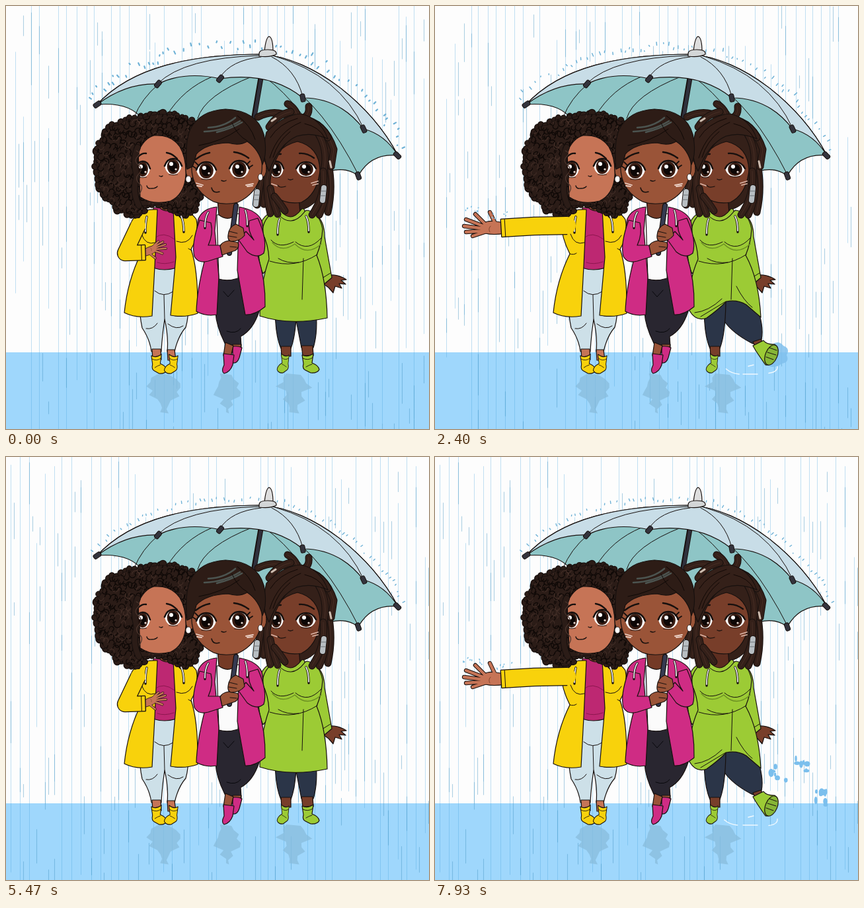
Animation, 640 px wide and 640 px high, one loop 8000 ms. Source, as an HTML page:

```html
<!DOCTYPE html>
<html lang="en">
<head>
<meta charset="utf-8">
<title>Three friends in the rain</title>
<style>
html, body { margin: 0; width: 100%; height: 100%; overflow: hidden; background: #fdfdfd; }
svg { display: block; width: 100%; height: 100%; }
</style>
</head>
<body>
<svg id="stage" viewBox="0 0 640 640" stroke-linecap="round" stroke-linejoin="round"></svg>
<script>
const LOOP = 8000, STEP = 1000 / 15, CYCLE = 5270;
const INK = '#17100e', YELLOW = '#f8d20c', PINK = '#cf2c84', GREEN = '#9ccb35', NAVY = '#2b3548';
const SKIN = ['#c67456', '#9a5438', '#783e2a'];
const HAIR = ['#2b1c17', '#2d1c16', '#342019'];
const stage = document.getElementById('stage');

function rng(seed) {
  return () => {
    seed = (seed * 1664525 + 1013904223) >>> 0;
    return seed / 4294967296;
  };
}
const shape = (d, fill, w = 1.2) => `<path d="${d}" fill="${fill}" stroke="${INK}" stroke-width="${w}"/>`;
const line = (d, w = 1, color = INK) => `<path d="${d}" fill="none" stroke="${color}" stroke-width="${w}"/>`;
const tube = (d, color, w) => line(d, w + 2) + line(d, w, color);
const oval = (x, y, rx, ry, fill, extra = '') => `<ellipse cx="${x}" cy="${y}" rx="${rx}" ry="${ry}" fill="${fill}" ${extra}/>`;
const group = (id, body) => `<g id="${id}">${body}</g>`;

function eye(x, y, rx, ry) {
  const lid = `M${x - rx},${y - 1} Q${x - rx * .7},${y - ry} ${x},${y - ry} Q${x + rx * .7},${y - ry} ${x + rx},${y - 1}`;
  return `<path d="${lid} Q${x + rx * .8},${y + ry} ${x},${y + ry} Q${x - rx * .8},${y + ry} ${x - rx},${y - 1} Z" fill="#fff"/>` +
    oval(x, y, rx * .72, ry * .93, '#3a1d13') + oval(x, y, rx * .5, ry * .66, '#0d0706') +
    oval(x - 3, y - 4, 3, 3, '#fff') + oval(x + 4, y + 4, 1.6, 1.6, '#e9d8d0') +
    line(lid, 2.6) + line(`M${x - rx * .5},${y + ry} Q${x},${y + ry + 1.5} ${x + rx * .5},${y + ry}`, .8);
}

const string = (x, y, dx) => line(`M${x},${y} Q${x + dx},${y + 8} ${x + dx},${y + 24}`, 3.4) +
  line(`M${x},${y} Q${x + dx},${y + 8} ${x + dx},${y + 22}`, 1.8, '#e6e6e6');

function boot(x, y, dir, color) {
  return `<g transform="translate(${x},${y}) scale(${dir},1)">` +
    shape('M-9,-25 Q-1,-21 8,-27 L6,-13 Q16,-9 17,-3 Q14,3 4,2 L-4,-2 Q-9,-4 -7,-12 Z', color) +
    line('M-8,-20 Q0,-16 7,-21 M-3,-7 Q2,-10 6,-11', .9) + '</g>';
}

function reflection(x, seed) {
  const r = rng(seed), left = [], right = [];
  for (let i = 0; i < 10; i++) {
    const w = (1 - Math.abs(i - 3) / 8) * 25 + (r() - .5) * 14;
    left.push(`${x - w + r() * 6},${556 + i * 6.5}`);
    right.unshift(`${x + w - r() * 6},${558 + i * 6.5}`);
  }
  return `<polygon points="${left.concat(right).join(' ')}" fill="#88bddd" opacity=".75"/>`;
}

const CANOPY = 'M138,149 C190,92 280,73 388,73 C466,80 552,148 593,226';

function umbrella() {
  const tips = [[138, 149, -35], [230, 118, -50], [324, 110, -50], [449, 139, 80], [541, 186, 65], [592, 226, 45], [533, 257, 70]];
  return shape(CANOPY + ' Q552,222 533,257 Q515,243 490,250 L300,225 Q225,215 207,172 Q188,145 138,149 Z', '#8ec5c6') +
    line('M312,107 Q268,125 243,166 M374,106 Q300,135 290,170 M231,118 Q205,140 194,168 M418,113 Q480,150 533,255 M391,107 Q450,150 497,244') +
    line('M386,106 L375,170', 8) + line('M386,108 L376,168', 5, '#30313c') +
    shape(CANOPY + ' Q573,194 541,186 Q505,139 449,139 Q400,99 324,110 Q270,98 230,118 Q182,116 138,149 Z', '#c8dde7') +
    line('M384,75 Q270,78 230,117 M386,77 Q340,82 324,108 M402,77 Q438,95 449,137 M407,76 Q505,105 541,185') +
    shape('M391,69 Q393,48 398,46 Q404,48 404,69 Z', '#dedede') +
    shape('M383,72 Q383,66 396,66 Q410,66 409,73 Q400,78 383,76 Z', '#d3d6d7') +
    tips.map(([x, y, a]) => `<rect x="${x - 6}" y="${y - 3.5}" width="12" height="7" rx="2.5" fill="#34343d" stroke="${INK}" transform="rotate(${a} ${x} ${y})"/>`).join('');
}

const CURLS = 'M205,170 Q245,155 283,176 Q300,200 292,250 Q299,290 283,311 Q265,323 240,300 L208,302 Q207,320 188,315 Q167,311 162,295 Q138,287 140,255 Q131,222 146,204 Q148,181 171,180 Q184,168 205,170 Z';

function curlTexture() {
  const r = rng(41);
  let d = '', glow = '';
  for (let y = 160; y < 325; y += 8)
    for (let x = 134; x < 304; x += 8) {
      const px = x + r() * 6, py = y + r() * 6, s = 3 + r() * 2.5;
      const arc = `M${px - s},${py} a${s},${s} 0 1 ${r() > .5 ? 1 : 0} ${s * 1.6},${s * .8}`;
      if (r() > .8) glow += arc; else d += arc;
    }
  return line(d, 1.3, '#0e0806') + line(glow, .9, '#4b352d');
}

function curlEdge() {
  const path = document.createElementNS('http://www.w3.org/2000/svg', 'path');
  path.setAttribute('d', CURLS);
  const total = path.getTotalLength(), r = rng(8);
  let out = '';
  for (let s = 0; s < total; s += 7) {
    const p = path.getPointAtLength(s);
    out += oval(p.x + r() * 4 - 2, p.y + r() * 4 - 2, 4 + r() * 2, 4 + r() * 2, HAIR[0], `stroke="${INK}" stroke-width="1.3"`);
  }
  return out;
}

function leftGirl() {
  const face = 'M203,289 L200,221 Q209,200 224,196 Q250,194 263,213 Q273,230 272,256 Q270,285 249,295 Q222,302 203,289 Z';
  return shape('M205,392 L273,392 Q280,460 272,486 Q260,500 255,523 L244,523 Q246,500 240,474 Q236,500 235,523 L220,523 Q218,505 206,487 Q198,450 205,392 Z', '#cde0e8') +
    line('M225,431 Q238,442 253,432 M239,437 L240,474 M212,488 Q222,490 229,480 M245,481 Q258,491 268,484') +
    shape('M221,519 L234,519 L235,535 L222,535 Z M244,520 L255,520 L257,536 L245,536 Z', SKIN[0]) +
    boot(228, 554, .9, YELLOW) + boot(253, 554, -.8, YELLOW) +
    shape('M223,305 L260,305 L258,396 Q240,402 222,396 Z', '#bd2872') +
    line('M225,351 Q238,340 255,353 M229,388 Q240,392 254,387', 1, '#8d174f') +
    shape('M233,288 L254,288 L252,307 Q243,313 233,306 Z', '#a4583a') +
    shape('M229,308 Q200,306 190,326 Q192,352 204,375 Q184,415 179,464 Q197,473 221,469 L225,394 Z', YELLOW) +
    shape('M253,307 Q279,308 288,323 Q293,346 280,368 Q291,400 290,465 Q271,472 249,468 L257,380 Z', YELLOW) +
    line('M205,345 Q211,363 226,358 M258,356 Q274,362 282,347 M204,375 Q210,377 214,374 M276,367 L281,370') +
    oval(240, 245, 44, 60, HAIR[0]) + curlEdge() + shape(CURLS, HAIR[0], .8) +
    `<g clip-path="url(#curls)">${curlTexture()}</g>` +
    shape(face, SKIN[0]) +
    `<g clip-path="url(#face)">${eye(207, 247, 11, 12)}</g>` + eye(253, 243, 13, 12) +
    line('M200,228 Q206,222 212,223 M243,222 Q251,223 259,231', 2.4) +
    line('M213,272 Q214,277 221,276 Q226,276 229,273 M232,257 Q235,259 237,257', 1.3) +
    tube('M199,214 Q191,232 198,258 Q190,280 201,302', HAIR[0], 8) +
    line('M197,219 q8,2 2,9 q-7,6 2,13 q7,6 -1,14 q-6,7 2,14 q7,5 0,15', 1.2, '#4b352d') +
    string(213, 319, -2) + string(265, 318, 4);
}

function midGirl() {
  return shape('M320,405 L364,405 L383,462 Q374,490 355,500 L356,516 L343,518 L332,512 Q318,485 317,463 Z', '#292630') +
    line('M329,432 L336,440 L345,430 M334,492 Q348,497 355,488', 1, '#08080c') +
    shape('M343,512 L356,512 L353,526 L342,524 Z', SKIN[1]) +
    shape('M343,515 Q352,514 357,517 L353,532 Q350,541 343,540 Z', PINK) +
    shape('M332,509 L344,514 L340,531 L329,529 Z', SKIN[1]) +
    shape('M329,526 L345,528 L343,543 Q339,554 330,556 Q325,553 330,543 Z', PINK) +
    shape('M319,316 L356,314 L351,412 Q335,417 322,413 Z', '#fbfbfb') +
    shape('M320,293 L350,293 L349,315 Q336,327 322,316 Z', '#743a26') +
    shape('M319,304 Q298,306 291,322 Q284,350 300,387 Q289,430 288,462 Q302,470 319,467 L322,410 L316,340 Z', PINK) +
    shape('M353,304 Q380,309 387,325 Q393,350 381,378 Q393,415 392,455 Q376,468 362,467 L350,400 Z', PINK) +
    line('M348,302 L338,374', 8) + line('M348,302 L338,374', 5.5, '#363a50') +
    shape('M293,324 Q280,360 285,379 Q291,390 306,386 L328,379 L324,362 L306,362 Q314,345 310,328 Z', PINK) +
    shape('M381,321 Q396,354 390,374 Q379,383 365,372 L352,354 L363,341 L375,354 Q365,340 368,325 Z', PINK) +
    shape('M324,363 Q326,357 337,355 L351,358 Q354,365 347,370 Q334,374 327,377 Z', SKIN[1]) +
    shape('M336,347 Q337,334 348,330 L359,336 L361,347 Q353,357 340,356 Q335,354 336,347 Z', SKIN[1]) +
    line('M338,341 L350,344 M337,348 L349,350 M339,364 L349,365', 1) +
    oval(279, 248, 7, 13, SKIN[1], `stroke="${INK}"`) + oval(388, 246, 6, 13, SKIN[1], `stroke="${INK}"`) +
    shape('M280,218 Q300,195 370,199 Q390,215 387,250 Q381,283 351,297 Q331,302 314,296 Q283,280 281,248 Z', SKIN[1]) +
    shape('M274,247 Q270,206 279,186 Q294,158 332,156 Q380,158 390,194 Q396,222 388,240 Q383,217 365,205 Q353,212 336,207 Q303,208 288,224 Q285,236 282,243 Z', HAIR[1]) +
    line('M300,190 Q330,189 354,174 M306,184 Q330,183 347,169 M319,191 Q340,186 357,176', 2.6, '#4c5450') +
    line('M292,211 Q327,205 353,186 M365,204 Q350,196 342,177 M377,202 Q370,180 350,166', .9, '#0c0705') +
    eye(303, 249, 15, 13) + eye(353, 247, 15, 13) +
    line('M288,246 l-6,-4 M291,241 l-5,-5 M367,245 l6,-4 M364,240 l5,-5', 1.8) +
    line('M287,232 Q297,224 308,222 M345,221 Q356,222 367,230', 2.6) +
    line('M311,275 Q313,284 323,281 M326,264 Q330,266 333,264', 1.4) +
    line('M288,268 L298,271 M289,272 L296,273 M363,271 L374,269 M365,273 L373,272', 1.8, '#eacfc4') +
    oval(276, 262, 4, 5, '#fff', `stroke="${INK}" stroke-width=".8"`) + oval(385, 259, 3.5, 5, '#fff', `stroke="${INK}" stroke-width=".8"`) +
    string(306, 312, -5) + string(362, 309, 3);
}

function rightGirl() {
  const locks = ['M448,176 Q399,190 390,300', 'M444,176 Q391,196 380,301', 'M450,180 Q404,206 395,262 Q394,290 400,314', 'M400,276 Q404,298 411,315', 'M406,288 Q416,300 422,310',
    'M451,178 Q493,194 488,239 Q495,276 487,312', 'M466,184 Q489,212 481,250 Q489,285 474,316', 'M480,250 Q484,285 463,316',
    'M448,171 Q482,175 496,217 L492,243', 'M430,168 Q407,155 381,168', 'M426,148 Q440,155 443,174', 'M443,171 Q460,169 458,152', 'M431,160 Q410,164 398,183', 'M455,173 Q478,180 487,199'];
  return group('standing', shape('M436,460 L469,460 Q472,494 465,517 L447,517 Z', NAVY) +
      shape('M447,514 L464,514 L465,529 L449,529 Z', SKIN[2]) + boot(457, 553, 1, GREEN)) +
    group('splash', '') +
    group('kicking', shape('M418,440 L480,440 Q499,478 494,505 L481,511 Q451,496 437,476 Z', NAVY) +
      shape('M481,508 L493,504 L498,514 L486,519 Z', SKIN[2]) +
      shape('M481,514 L497,506 Q501,512 514,512 Q521,520 515,533 Q509,544 500,543 Q495,536 485,521 Z', GREEN) +
      oval(509, 528, 9, 16, '#86b536', `stroke="${INK}" stroke-width="1.2" transform="rotate(22 509 528)"`) +
      line('M506,517 L517,521 M503,524 L516,528 M501,531 L512,535', 1)) +
    shape('M408,440 L440,440 Q440,495 431,518 L416,518 Q405,493 408,440 Z', NAVY) +
    shape('M416,515 L431,515 L431,530 L417,530 Z', SKIN[2]) + boot(422, 553, -.7, GREEN) +
    shape('M480,410 L489,407 Q503,406 515,414 L507,415 L514,421 L504,420 L508,427 L498,424 L495,434 L488,426 L481,421 Z', SKIN[2]) +
    shape('M470,317 Q482,326 482,349 L493,411 L480,422 L463,354 Z', GREEN) + line('M478,412 L491,404') +
    shape('M405,311 Q384,317 382,345 Q380,387 389,405 L403,390 Z', GREEN) +
    group('coat', shape('M409,309 Q388,321 388,343 Q397,361 398,383 Q385,419 384,469 Q430,484 486,472 Q485,414 470,377 Q478,358 479,337 Q474,312 455,309 Q430,325 409,309 Z', GREEN)) +
    group('coatUp', shape('M409,309 Q388,321 388,343 Q397,361 398,383 Q382,419 385,461 Q395,478 411,472 Q428,460 441,447 Q458,444 471,452 L493,471 Q490,413 470,377 Q478,358 479,337 Q474,312 455,309 Q430,325 409,309 Z', GREEN) +
      line('M393,464 Q414,462 434,443 M402,470 Q420,459 440,447 M480,456 Q467,446 456,424')) +
    line('M450,382 L448,444 M399,386 Q437,398 471,376 M401,354 Q413,368 435,357 M438,357 Q457,373 477,351 M412,382 Q425,390 443,388') +
    line('M403,358 Q417,374 437,360 Q456,379 477,360', 1.5, '#6b8f22') +
    oval(436, 240, 54, 70, HAIR[2], `stroke="${INK}"`) +
    shape('M418,287 L443,287 L445,314 Q431,328 418,314 Z', '#5d2e20') +
    line('M413,312 Q431,333 449,310', 7) + line('M413,312 Q431,333 449,310', 5, GREEN) +
    shape('M397,262 Q400,215 441,205 Q474,213 475,249 Q471,285 447,297 Q425,301 406,288 Q396,277 397,262 Z', SKIN[2]) +
    eye(409, 247, 11, 12) + eye(454, 247, 15, 11) +
    line('M403,229 Q408,224 416,224 M444,223 Q455,222 466,230', 2.3) +
    line('M411,271 Q414,276 423,273 M427,262 Q430,264 434,262', 1.3) +
    line('M402,269 l8,3 M462,268 l10,-3 M464,271 l8,-2', 1.8, '#dbb5a7') +
    locks.map(d => tube(d, HAIR[2], 9) + line(d, 1, '#472e25')).join('') +
    shape('M394,191 Q419,165 446,163 Q476,170 487,201 Q462,190 440,197 Q413,209 398,250 Q385,225 394,191 Z', HAIR[2]) +
    line('M446,176 Q411,190 399,230 M441,170 Q413,178 400,199 M452,178 Q474,183 482,199 M430,190 Q411,205 404,229', 1, '#110805') +
    [[380, 290], [481, 284]].map(([x, y]) => line(`M${x},${y - 9} L${x - 2},${y + 10}`, 10) + line(`M${x},${y - 9} L${x - 2},${y + 10}`, 8, '#b8bec2') + line(`M${x - 4},${y - 4} h7 M${x - 5},${y + 3} h7`, 1, '#6d7377')).join('') +
    line('M402,174 L408,170 M490,235 L492,244', 3, '#cdbdb0') +
    string(414, 322, -3) + string(454, 318, 4);
}

// One sheet of rain: faint streaks with darker dashes on them.
function rainSheet(i) {
  const r = rng(100 + i * 37);
  let faint = '', dash = '';
  for (let x = [14, 17, 7][i]; x < 637; x += 10 + r() * 6) {
    const px = Math.round(x) + .5;
    faint += r() > .35 ? `M${px},0 V640` : `M${px},${r() * 200} V${350 + r() * 290}`;
    for (let k = 0; k < 3; k++) {
      const y = r() * 640, dx = r() > .5 ? 0 : 5;
      dash += `M${px + dx},${y} v${18 + r() * 50}`;
    }
  }
  return line(faint, 1, 'rgba(75,165,220,.34)') + line(dash, 1.1, 'rgba(65,145,190,.42)');
}

function canopyDrops(i) {
  const path = document.createElementNS('http://www.w3.org/2000/svg', 'path');
  path.setAttribute('d', CANOPY);
  const total = path.getTotalLength(), r = rng(500 + i * 11), reach = [17, 13, 9][i];
  let d = '';
  for (let s = 0; s < total; s += 5 + r() * 8) {
    const p = path.getPointAtLength(s), q = path.getPointAtLength(Math.min(total, s + 2)), o = path.getPointAtLength(Math.max(0, s - 2));
    const len = Math.hypot(q.x - o.x, q.y - o.y) || 1, nx = (q.y - o.y) / len, ny = (o.x - q.x) / len;
    const h = 5 + r() * reach, size = 1 + r() * [3, 4, 3][i], lean = r() - .5;
    d += `M${p.x + nx * h},${p.y + ny * h} l${nx * size + lean * 2},${ny * size}`;
  }
  return line(d, [2.2, 1.5, 1.4][i], '#6fb2d6');
}

function handDrops(i) {
  const r = rng(70 + i * 5);
  let d = '';
  for (let k = 0; k < 13; k++) {
    const x = 32 + r() * 88;
    d += `M${x},${316 - Math.abs(Math.sin(x / 30)) * 14 + r() * 8} l${r() * 2 - 1},${r() * 2}`;
  }
  return line(d, 1.6, '#7fbfe2');
}

const sheets = [0, 1, 2];
stage.innerHTML =
  `<defs><clipPath id="curls"><path d="${CURLS}"/></clipPath><clipPath id="face"><path d="M200,200 H280 V300 H200 Z"/></clipPath></defs>` +
  '<rect width="640" height="640" fill="#fdfdfd"/><rect y="524" width="640" height="116" fill="#9fd7fc"/>' +
  sheets.map(i => group('rain' + i, rainSheet(i))).join('') +
  reflection(240, 3) + reflection(335, 9) + reflection(435, 21) + group('ripples', '') +
  sheets.map(i => group('drops' + i, canopyDrops(i))).join('') +
  umbrella() + rightGirl() + leftGirl() + group('arm', '') + midGirl() +
  sheets.map(i => group('hand' + i, handDrops(i))).join('');

const $ = id => document.getElementById(id);
const show = (id, on) => { $(id).style.display = on ? '' : 'none'; };
const mix = (a, b, p) => a + (b - a) * p;

// Arm poses: elbow x, y, wrist x, y, hand angle, hand size.
const REST = [180, 374, 211, 373, 155, .58], RAISED = [181, 370, 178, 348, 104, .74],
  REACH = [155, 345, 114, 345, 17, .94], OUT = [150, 333, 100, 336, 0, 1];
const armKeys = [[0, REST], [870, REST], [1000, RAISED], [1130, REACH], [1270, OUT], [4270, OUT], [4370, REACH],
  [4470, RAISED], [4600, REST], [6140, REST], [6270, RAISED], [6400, REACH], [6530, OUT], [8000, OUT]];

function armPose(t) {
  const i = Math.max(1, armKeys.findIndex(k => k[0] >= t));
  const [t0, a] = armKeys[i - 1], [t1, b] = armKeys[i];
  return a.map((v, k) => mix(v, b[k], (t - t0) / (t1 - t0)));
}

function drawArm([ex, ey, wx, wy, turn, size]) {
  const sleeve = `M200,332 L${ex},${ey} L${wx},${wy}`;
  const len = Math.hypot(wx - ex, wy - ey) || 1, ux = (wx - ex) / len, uy = (wy - ey) / len;
  const half = mix(11, 13, (size - .58) / .42);
  const cuff = b => `M${wx - ux * b - uy * half},${wy - uy * b + ux * half} L${wx - ux * b + uy * half},${wy - uy * b - ux * half}`;
  const fingers = 'M22,-4 L39,-21 M24,-2 L53,-13 M24,1 L56,-3 M24,4 L53,6 M22,5 L43,12 M8,-5 L17,-24';
  const stroke = (w, c) => `<path d="${sleeve}" fill="none" stroke="${c}" stroke-width="${w}" stroke-linecap="butt"/>`;
  return `<g transform="translate(${wx},${wy}) rotate(${turn}) scale(${-size},${size})">` +
    line(fingers, 6.4) + shape('M-6,-8 L8,-10 Q20,-12 27,-7 Q31,1 24,8 Q12,11 -6,8 Z', SKIN[0]) + line(fingers, 4.4, SKIN[0]) +
    line('M16,-3 Q20,1 17,6', .9, '#7d412b') + '</g>' +
    stroke(half * 2 + 2.4, INK) + oval(200, 332, half, half, YELLOW) + stroke(half * 2, YELLOW) + line(cuff(0), 1.3) + line(cuff(6), 1);
}

function kickAmount(t) {
  return Math.max(0, Math.min(1, (t - 2200) / 130, (3000 - t) / 200));
}

function drawSplash(age) {
  if (age < 0 || age > 520) return '';
  if (age < 150)
    return `<path d="M492,521 Q500,507 510,512 Q520,505 527,514 Q538,518 532,528 Q537,539 525,541 Q510,552 496,539 Z" fill="#80c1ee" opacity="${1 - age / 500}"/>`;
  const p = age / 333, r = rng(15);
  let out = '';
  for (const [x, y, n] of [[521, 477, 6], [555, 465, 7], [581, 515, 9]])
    for (let k = 0; k < n; k++)
      out += oval(mix(520, x, p) + (r() - .5) * 25, mix(525, y, p) + (r() - .5) * 25, 1.5 + r() * 3, 2 + r() * 4.5, '#7bbfed');
  return out;
}

function drawRipples(age) {
  if (age < 0 || age > 1050) return '';
  const s = age / 1000, d = age < 600
    ? `M${441 - s * 10},549 q8,7 20,8 M466,557 h22 M505,${555 + s * 8} q14,-2 13,-10 M474,545 l8,-2`
    : 'M494,544 l7,5 M506,558 q10,0 13,-5 M496,568 l8,3 M511,541 l5,3';
  return line(d, 1.4, 'rgba(255,255,255,.85)');
}

// Gusts shift the order of the three rain sheets.
const gusts = [0, 2, 1, 2, 0, 1, 2, 0];

function render(ms) {
  const n = Math.floor(((ms % LOOP) + 8) / STEP) % 120, t = n * STEP;
  const sheet = (n + gusts[n >> 4]) % 3;
  const phase = t > 6800 ? t - CYCLE : t, kick = kickAmount(phase), up = kick > .5;
  const pose = armPose(t);
  for (const i of sheets) {
    show('rain' + i, i === sheet);
    show('drops' + i, i === sheet);
    show('hand' + i, i === sheet && pose[5] > .97);
  }
  show('standing', !up);
  show('kicking', up);
  show('coat', !up);
  show('coatUp', up);
  $('standing').setAttribute('transform', `rotate(${-kick * 24} 455 472)`);
  $('kicking').setAttribute('transform', `rotate(${(1 - kick) * 20} 455 465)`);
  $('splash').innerHTML = drawSplash(phase - 2330);
  $('ripples').innerHTML = drawRipples(phase - 2330);
  $('arm').innerHTML = drawArm(pose);
}

const start = performance.now();
function tick(now) {
  render(Math.max(0, now - start));
  requestAnimationFrame(tick);
}
render(0);
requestAnimationFrame(tick);
</script>
</body>
</html>
```
